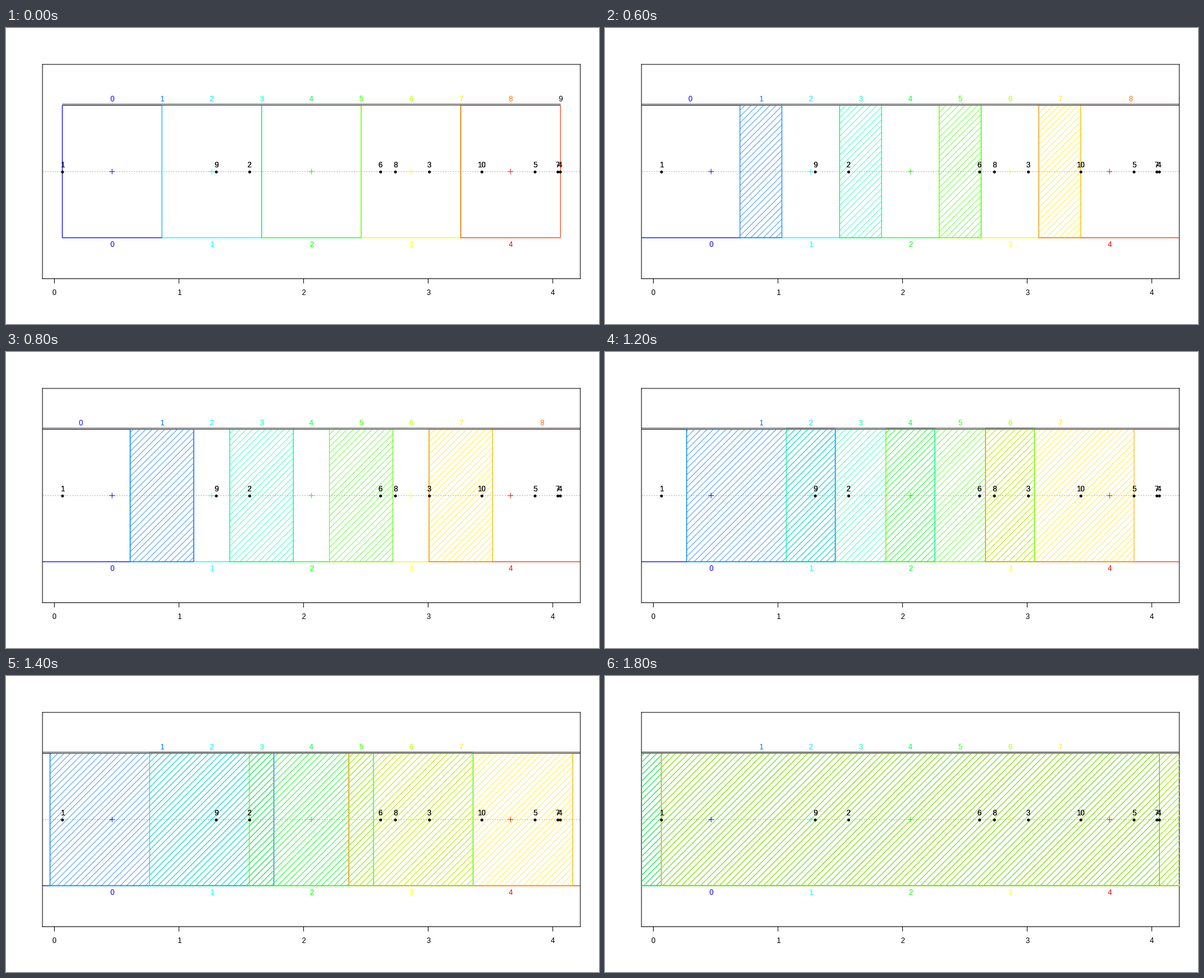
A matplotlib script that plays this animation: 960x480 px, repeating every 2000 ms.

```python
import colorsys

import numpy as np
import matplotlib.pyplot as plt
from matplotlib.animation import FuncAnimation
from matplotlib.collections import LineCollection
from matplotlib.patches import Rectangle

plt.rcParams["font.family"] = "Liberation Sans"
plt.rcParams["font.size"] = 12
plt.rcParams["path.snap"] = False

W, H, DPI = 960, 480, 72
LEFT, RIGHT, TOP, BOTTOM = 59.04, 929.76, 59.04, 406.56
MID = (TOP + BOTTOM) / 2
REACH = 107.3                       # half height of the cover boxes
ORIGIN, UNIT = 78.3, 201.7          # pixel of x = 0 and pixels per unit
HATCH_STEP = 7.2 * np.sqrt(2)

# Data points, labelled 1 to 10, as pixel positions
POINTS = np.array([91.2, 393.8, 684.8, 897.5, 856.5,
                   606.2, 893.0, 630.5, 770.2, 340.5])
NAMES = [1, 2, 3, 4, 5, 6, 7, 8, 10, 9]

COUNT = 5
STEP = (POINTS.max() - POINTS.min()) / COUNT
CENTERS = POINTS.min() + STEP * (np.arange(COUNT) + 0.5)
CRITICAL = np.abs(POINTS[:, None] - CENTERS).ravel()


def rainbow(n):
    return [colorsys.hsv_to_rgb(hue, 1, 1) for hue in np.linspace(2 / 3, 0, n)]


SET_COLORS = rainbow(COUNT)
LEVEL_COLORS = rainbow(2 * COUNT)

fig = plt.figure(figsize=(W / DPI, H / DPI), dpi=DPI, facecolor="white")
ax = fig.add_axes([LEFT / W, 1 - BOTTOM / H,
                   (RIGHT - LEFT) / W, (BOTTOM - TOP) / H])


def half_width(overlap):
    """Largest critical half width that the overlap allows."""
    limit = STEP / 2 / (1 - overlap) + 1e-6
    return CRITICAL[CRITICAL <= limit].max()


def label(x, y, text, color="black", clip=True):
    ax.text(x, y + 4.3, str(text), color=color, ha="center", va="baseline",
            clip_on=clip, zorder=6)


def box(x0, x1, color, **style):
    ax.add_patch(Rectangle((x0, MID - REACH), x1 - x0, 2 * REACH,
                           fill=False, ec=color, lw=1, **style))


def hatch(x0, x1, color):
    first = np.floor((x0 - REACH - ORIGIN) / HATCH_STEP)
    last = np.ceil((x1 + REACH - ORIGIN) / HATCH_STEP)
    base = ORIGIN + HATCH_STEP * np.arange(first, last + 1)
    start = np.maximum(-REACH, x0 - base)
    end = np.minimum(REACH, x1 - base)
    lines = [[(b + s, MID - s), (b + e, MID - e)]
             for b, s, e in zip(base, start, end) if s < e]
    ax.add_collection(LineCollection(lines, colors=[color], linewidths=0.9,
                                     alpha=0.75, zorder=3), autolim=False)


def level_bounds(level, lo, hi):
    i = level // 2
    if level % 2:
        return lo[i + 1], hi[i]
    return (hi[i - 1] if i else lo[0],
            lo[i + 1] if i < COUNT - 1 else hi[-1])


def draw_cover(half):
    lo, hi = CENTERS - half, CENTERS + half
    for x0, x1, color in zip(lo, hi, SET_COLORS):
        box(x0, x1, color, zorder=2)
    for level in range(2 * COUNT - 1):
        x0, x1 = level_bounds(level, lo, hi)
        color = LEVEL_COLORS[level]
        if abs(x1 - x0) > 1:
            box(x0, x1, color, alpha=0.5, zorder=3)
            ax.plot([x0, x1], [123.6] * 2, color="black", lw=0.8, zorder=4)
            if level % 2:
                hatch(x0, x1, color)
        x = (x0 + x1) / 2
        label(x, MID - 1.1 * REACH, level, color)
    label(hi[-1], MID - 1.1 * REACH, 2 * COUNT - 1)
    ax.plot([lo[0], hi[-1]], [MID - REACH] * 2, color="black", lw=0.9,
            alpha=0.7, zorder=4)
    if half > 2 * STEP:
        ax.plot([POINTS.max()] * 2, [MID - REACH, MID + REACH],
                color="0.55", lw=0.9, zorder=4)


def draw_axis():
    for value in range(5):
        x = ORIGIN + UNIT * value
        ax.plot([x, x], [BOTTOM, BOTTOM + 7.2], color="black", lw=1,
                clip_on=False, snap=True)
        label(x, 428.7, value, clip=False)
    for spine in ax.spines.values():
        spine.set_linewidth(1)
        spine.set_snap(True)


def draw(frame):
    ax.clear()
    ax.set(xlim=(LEFT, RIGHT), ylim=(BOTTOM, TOP), xticks=[], yticks=[],
           autoscale_on=False)
    ax.plot([LEFT, RIGHT], [MID, MID], color="0.7", lw=1,
            dashes=(2, 2), zorder=1)
    draw_cover(half_width(frame / 10))
    for i, (x, color) in enumerate(zip(CENTERS, SET_COLORS)):
        ax.plot([x - 4, x + 4], [MID, MID], color=color, lw=0.9, zorder=5)
        ax.plot([x, x], [MID - 4, MID + 4], color=color, lw=0.9, zorder=5)
        label(x, MID + 1.1 * REACH, i, color)
    ax.plot(POINTS, [MID] * len(POINTS), "o", color="black", ms=4.6, mew=0,
            zorder=6)
    for x, name in zip(POINTS, NAMES):
        for _ in range(2):          # overprinting makes the digits heavier
            label(x, MID - 0.1 * REACH, name)
    draw_axis()
    return []


anim = FuncAnimation(fig, draw, frames=10, interval=200, repeat=True,
                     repeat_delay=0, init_func=lambda: [], blit=False)
plt.show()
```
